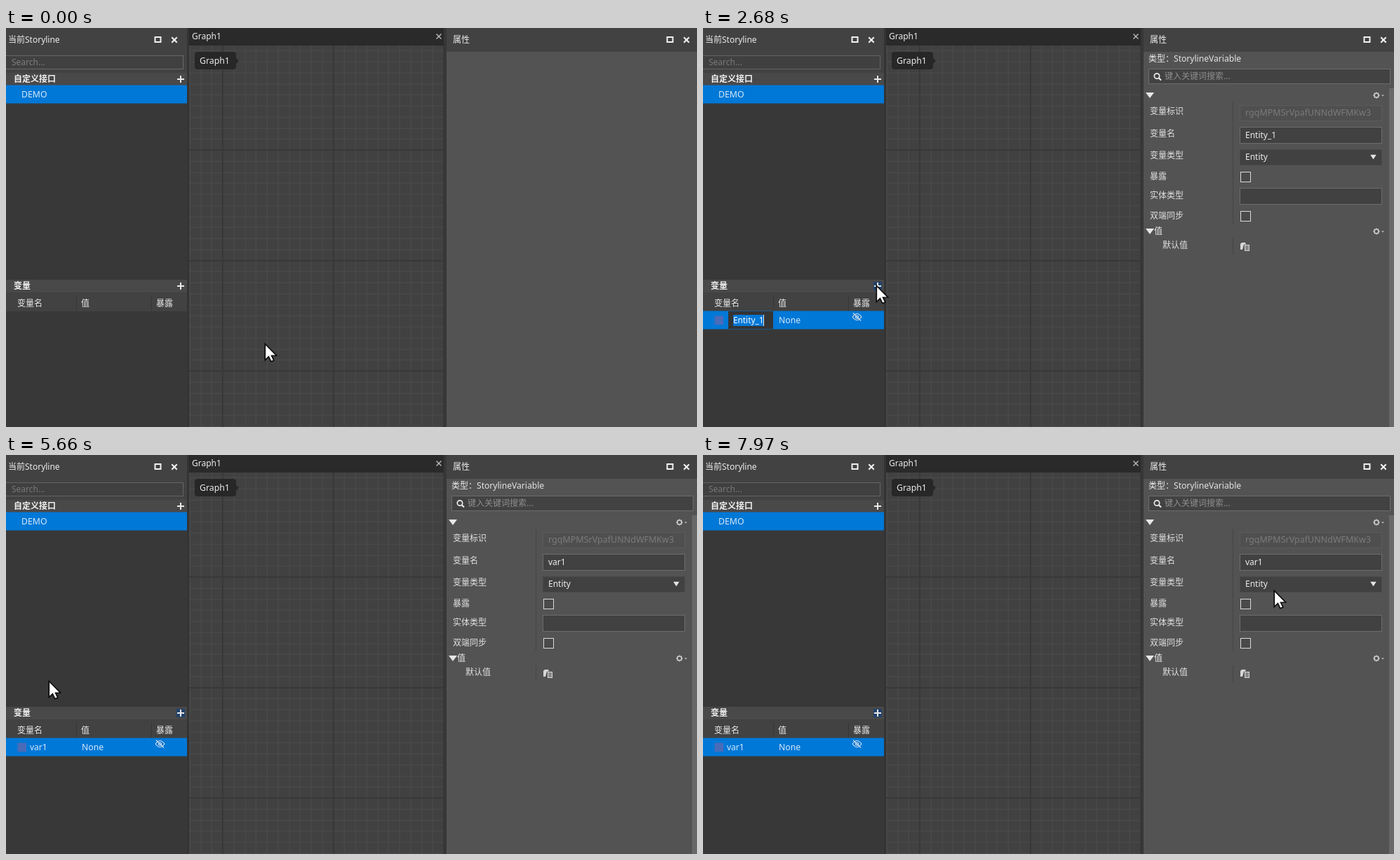
Recreate the animation shown at these times as an HTML page with a canvas. Size 985x569 px, loop 8 s.

```html
<!DOCTYPE html>
<html lang="zh-CN">
<head>
<meta charset="utf-8">
<title>Variable editor</title>
<style>
html, body { margin: 0; width: 100%; height: 100%; overflow: hidden; background: #383838; }
canvas { display: block; }
</style>
</head>
<body>
<canvas id="stage" width="985" height="569"></canvas>
<script>
const ctx = document.getElementById('stage').getContext('2d');
const LOOP = 8000;
const UI = '"Noto Sans", "Noto Sans CJK SC", "Noto Sans CJK", sans-serif';
const SERIF = '"Liberation Serif", serif';
const MONO = '"Liberation Mono", "Noto Sans CJK SC", "Noto Sans CJK", monospace';
const BLUE = '#0078d7';

function rect(x, y, w, h, color) {
  ctx.fillStyle = color;
  ctx.fillRect(x, y, w, h);
}

function frame(x, y, w, h, fill, border) {
  rect(x, y, w, h, border);
  rect(x + 1, y + 1, w - 2, h - 2, fill);
}

// y is the optical middle of the line
function text(s, x, y, color = '#ececec', size = 12, weight = 400, family = UI) {
  ctx.font = `${weight} ${size}px ${family}`;
  ctx.fillStyle = color;
  ctx.fillText(s, x, y + Math.round(size * 0.35));
}

function poly(points, fill) {
  ctx.beginPath();
  points.forEach(([x, y]) => ctx.lineTo(x, y));
  ctx.closePath();
  ctx.fillStyle = fill;
  ctx.fill();
}

function line(x1, y1, x2, y2, color, width = 1) {
  ctx.beginPath();
  ctx.moveTo(x1, y1);
  ctx.lineTo(x2, y2);
  ctx.strokeStyle = color;
  ctx.lineWidth = width;
  ctx.stroke();
}

function round(x, y, w, h, r, color) {
  ctx.beginPath();
  ctx.roundRect(x, y, w, h, r);
  ctx.fillStyle = color;
  ctx.fill();
}

function circle(x, y, r, color, width) {
  ctx.beginPath();
  ctx.arc(x, y, r, 0, Math.PI * 2);
  ctx.strokeStyle = color;
  ctx.lineWidth = width;
  ctx.stroke();
}

function cross(x, y, r, color, width) {
  line(x - r, y - r, x + r, y + r, color, width);
  line(x - r, y + r, x + r, y - r, color, width);
}

function plus(x, y, hover) {
  if (hover) rect(x - 6, y - 6, 12, 12, '#21426c');
  rect(x - 5, y - 1, 10, 2, '#e8e8e8');
  rect(x - 1, y - 5, 2, 10, '#e8e8e8');
}

function windowIcons(x) {
  ctx.strokeStyle = '#f2f2f2';
  ctx.lineWidth = 2;
  ctx.strokeRect(x - 3.5, 13, 8, 7);
  cross(x + 24, 17, 3.7, '#f2f2f2', 2);
}

function downArrow(x, y, w, h, color = '#e6e6e6') {
  poly([[x - w / 2, y - h / 2], [x + w / 2, y - h / 2], [x, y + h / 2]], color);
}

function gear(x, y) {
  circle(x, y, 3, '#cfcfcf', 1.5);
  for (let i = 0; i < 8; i++) {
    const a = i * Math.PI / 4, c = Math.cos(a), s = Math.sin(a);
    line(x + c * 3, y + s * 3, x + c * 4.6, y + s * 4.6, '#cfcfcf', 1.3);
  }
  downArrow(x + 9, y + 0.5, 4, 2, '#c4c4c4');
}

function hiddenEye(x, y) {
  ctx.beginPath();
  ctx.moveTo(x - 6.5, y);
  ctx.quadraticCurveTo(x, y - 9, x + 6.5, y);
  ctx.quadraticCurveTo(x, y + 9, x - 6.5, y);
  ctx.strokeStyle = '#cfdbe8';
  ctx.lineWidth = 1.2;
  ctx.stroke();
  circle(x, y, 2, '#cfdbe8', 1.2);
  line(x - 5.5, y - 5.5, x + 5.5, y + 5.5, '#cfdbe8', 1.3);
}

function cursor([x, y]) {
  ctx.save();
  ctx.translate(x, y);
  ctx.beginPath();
  [[0.3, 1.5], [0.3, 24.5], [5.4, 19.7], [8.8, 26.7], [12.8, 25], [9.6, 18.2], [16.5, 18]]
    .forEach(([px, py]) => ctx.lineTo(px, py));
  ctx.closePath();
  ctx.fillStyle = '#fff';
  ctx.fill();
  ctx.strokeStyle = '#0c0c0c';
  ctx.lineWidth = 1.7;
  ctx.stroke();
  ctx.restore();
}

function leftPanel(t) {
  const added = t >= 1690;
  rect(0, 0, 258, 569, '#383838');
  rect(0, 0, 258, 64, '#424242');
  text('当前Storyline', 3, 17);
  windowIcons(216);
  frame(-1, 39, 254, 20, '#404040', added ? '#646464' : '#696969');
  text('Search...', 8, 49, added ? '#787878' : '#7d7d7d');

  rect(0, 64, 258, 18, '#494949');
  text('自定义接口', 11, 73, '#f2f2f2', 12, 700);
  plus(249, 73);
  rect(0, 81.5, 258, 26, BLUE);
  text('DEMO', 22, 95, '#d6e8f8', 12.3);

  rect(0, 359, 258, 18, '#494949');
  text('变量', 11, 368, '#f2f2f2', 12, 700);
  plus(249, 368, t >= 1360);
  rect(0, 377, 258, 27, '#424242');
  rect(100, 382, 1, 21, '#373737');
  rect(207, 382, 1, 21, '#373737');
  text('变量名', 16, 393);
  text('值', 107, 393);
  text('暴露', 214, 393);
  if (added) variableRow(t);
}

function variableRow(t) {
  rect(0, 403.5, 258, 26, BLUE);
  rect(16.5, 410.5, 12.5, 12.5, '#4a6bb8');
  text('None', 108, 417, '#d6e8f8', 12.2);
  hiddenEye(219.5, 412);
  if (t >= 4600) {
    text('var1', 34, 417, '#d6e8f8');
    return;
  }
  rect(36, 404, 64, 25, '#343434');
  const typed = t >= 3740 ? 'var1' : t >= 3610 ? 'var' : '';
  if (typed) {
    text(typed, 43, 417);
    if (t < 4400) rect(typed === 'var' ? 61 : 68, 409, 1, 16, '#e4e4e4');
    return;
  }
  rect(43, 409, 43, 16, BLUE);
  text('Entity_1', 43, 417, '#fff', 11.8);
  if (t < 2150 || t >= 2680 && t < 3210) rect(86, 409, 1, 16, '#e4e4e4');
}

function candidates(t) {
  if (t < 2940 || t >= 3610) return;
  const typed = t < 3010 ? 'v' : t < 3210 ? 'va' : 'var';
  const words = typed === 'var' ? ['var', '把人', '八人', '八日', 'v']
    : typed === 'va' ? ['va', '把', '八', '吧', 'v']
    : ['v', '输入数字或算式进行转换', '以', '为', '从'];
  round(62, 434, typed === 'v' ? 218 : 155, 150, 12, '#303030');
  text(typed, 70, 450, '#dedede', 16, 700, '"Liberation Sans", Arial, sans-serif');
  rect(70 + typed.length * 8, 442, 1, 17, '#2b93dc');
  words.forEach((word, i) => {
    const y = i ? 475.5 + i * 20.9 : 477;
    const color = i ? '#d0d0d0' : '#1686d8';
    text(i + 1 + '.', 70, y, color, 16, 400, SERIF);
    text(word, 85, y, color, /[a-z]/.test(word) ? 13.4 : 16, 300, MONO);
  });
  if (t >= 3280) {
    circle(122.5, 494, 5, '#d4d4d4', 1);
    line(120, 494, 122, 496, '#d4d4d4');
    line(122, 496, 126, 491.5, '#d4d4d4');
  }
}

function graph() {
  rect(258, 0, 3, 569, '#343434');
  rect(261, 0, 364, 569, '#414141');
  const step = 15.75;
  ctx.save();
  ctx.beginPath();
  ctx.rect(261, 25, 363, 544);
  ctx.clip();
  for (let i = -10; i < 27; i++) {
    const x = 309 + i * step, y = 174 + i * step;
    rect(Math.round(x) - 0.5, 25, 1.5, 544, '#494949');
    rect(261, Math.round(y) - 0.5, 363, 1.5, '#494949');
  }
  for (let i = 0; i < 3; i++) {
    const d = i * step * 10;
    rect(Math.round(309 + d) - 1, 25, 2, 544, '#383838');
    rect(261, Math.round(174 + d) - 1, 363, 2, '#383838');
  }
  ctx.restore();
  rect(261, 0, 364, 25, '#2a2a2a');
  text('Graph1', 265, 12);
  cross(617, 12, 3.5, '#b8b8b8', 1.4);
  round(269, 34, 59, 25, 4, '#272727');
  poly([[328, 43], [332, 47], [328, 51]], '#272727');
  text('Graph1', 276, 47, '#ececec', 12.3);
  rect(624, 0, 4, 569, '#373737');
}

function checkbox(y) {
  frame(766, y, 15, 15, '#4a4a4a', '#dadada');
}

function properties(t) {
  rect(628, 0, 357, 569, '#535353');
  rect(628, 0, 357, 34, '#424242');
  text('属性', 637, 17);
  windowIcons(946);
  if (t < 1690) return;

  text('类型：', 635, 44);
  text('StorylineVariable', 671, 44, '#e4e4e4', 12.1);
  frame(635, 58, 345, 22, '#424242', '#6c6c6c');
  circle(647, 68.5, 3.7, '#eee', 1.7);
  line(649.7, 71.2, 653, 74.5, '#eee', 2);
  text('键入关键词搜索...', 658, 69, '#8f8f8f');
  rect(978, 86, 7, 483, '#686868');

  downArrow(637, 96, 12, 8);
  gear(960, 96);
  rect(755, 106, 1, 174, '#444');
  [['变量标识', 119], ['变量名', 151], ['变量类型', 182], ['暴露', 212],
   ['实体类型', 239], ['双端同步', 268]].forEach(([s, y]) => text(s, 637, y, '#e2e2e2'));

  frame(765, 110, 203, 23, '#4f4f4f', '#5b5b5b');
  text('rgqMPMSrVpafUNNdWFMKw3', 773, 121, '#7b7b7b', 12.5);
  frame(765, 141, 203, 24, '#414141', '#6c6c6c');
  text(t < 4600 ? 'Entity_1' : 'var1', 773, 153);
  frame(765, 173, 203, 23, '#414141', '#4a4a4a');
  text('Entity', 773, 184);
  downArrow(955.5, 184, 8.5, 6.5);
  checkbox(205);
  frame(765, 228, 203, 24, '#414141', '#6c6c6c');
  checkbox(261);

  downArrow(637, 290, 12, 8);
  text('值', 643, 290);
  gear(960, 290);
  text('默认值', 655, 310, '#e2e2e2');
  rect(755, 300, 1, 23, '#444');
  poly([[766, 316], [766, 308], [768, 306], [773, 306], [774, 308], [771, 309], [769, 316]], '#d6d6d6');
  frame(772, 309, 7, 9, '#8a8a8a', '#d6d6d6');
}

const smooth = p => p * p * (3 - 2 * p);
const easeIn = p => p ** 1.3;
const easeOut = p => 1 - (1 - p) ** 1.6;

// first step time, step length, steps, target x, target y, easing
const MOVES = [
  [590, 70, 12, 247, 366, smooth],
  [5660, 1, 1, 61, 321, smooth],
  [5730, 70, 6, 85, 362, smooth],
  [6280, 70, 6, 695, 193, easeIn],
  [6700, 70, 3, 812, 145, easeOut],
  [7630, 85, 4, 814, 197, smooth],
  [7970, 1, 1, 814, 192, smooth]
];

function pointer(t) {
  let x = 369, y = 449;
  for (const [start, dt, steps, tx, ty, ease] of MOVES) {
    if (t < start) break;
    const p = ease(Math.min(1, (Math.floor((t - start) / dt) + 1) / steps));
    x += (tx - x) * p;
    y += (ty - y) * p;
  }
  return [x, y];
}

function draw(t) {
  leftPanel(t);
  graph();
  properties(t);
  candidates(t);
  cursor(pointer(t));
}

const began = performance.now();
function tick() {
  draw((performance.now() - began) % LOOP);
  requestAnimationFrame(tick);
}
tick();
</script>
</body>
</html>
```
